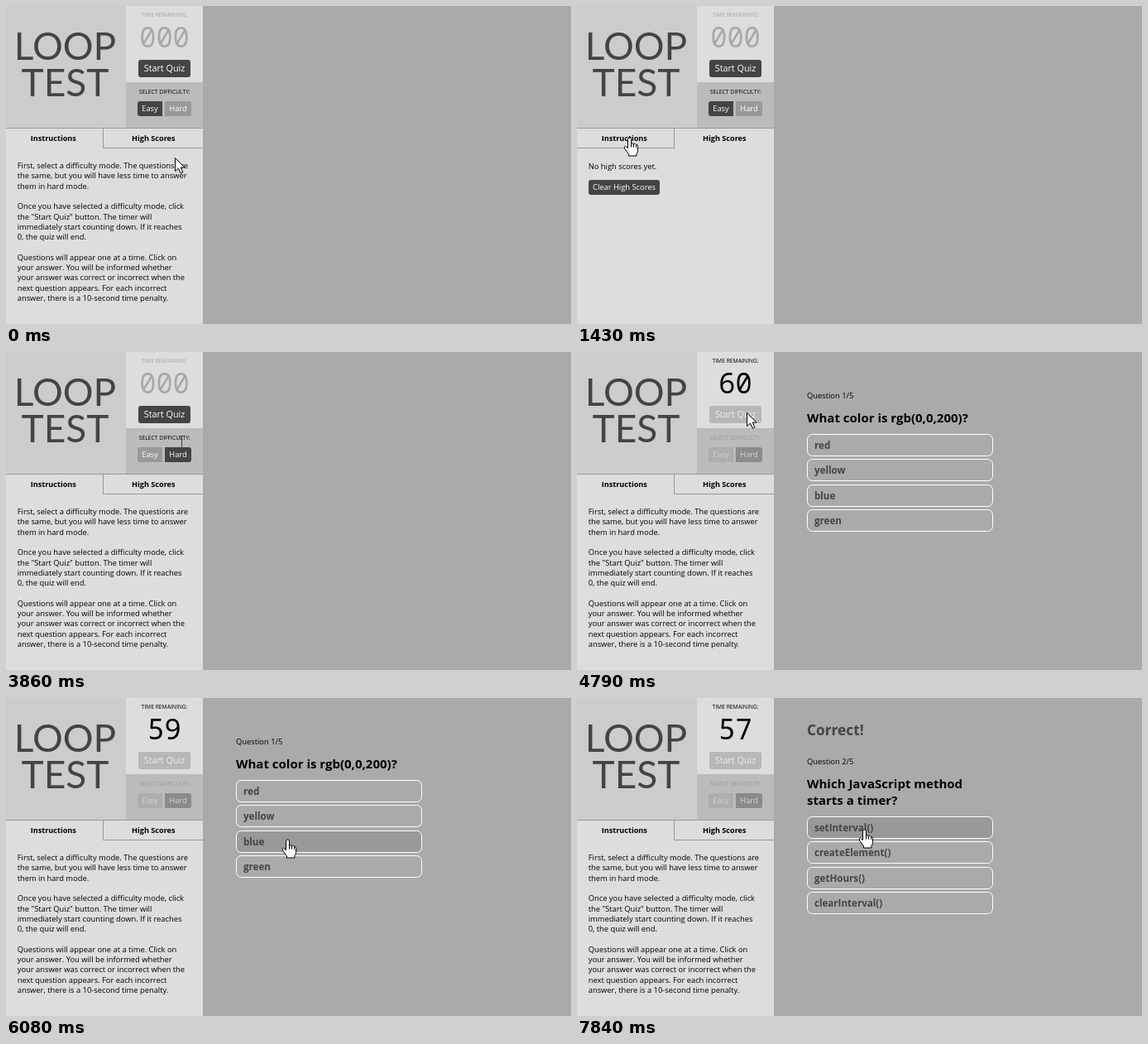
These frames come from a looping animation (683 px wide and 384 px high, 8000 ms). An HTML page with a canvas:

```html
<!DOCTYPE html>
<html lang="en">
<head>
<meta charset="utf-8">
<title>Loop Test</title>
<style>
html, body { margin: 0; width: 100%; height: 100%; overflow: hidden; background: #aaa; }
canvas { display: block; width: 683px; height: 384px; }
</style>
</head>
<body>
<canvas id="stage" width="683" height="384"></canvas>
<script>
const ctx = document.getElementById('stage').getContext('2d');
const LOOP = 8000;
const SANS = '"Open Sans", "Noto Sans", sans-serif';
const BODY = `9.35px ${SANS}`;
const SMALL = `6.75px ${SANS}`;
const DARK = '#444', LINE = '#999';

const INSTRUCTIONS = [
  'First, select a difficulty mode. The questions are',
  'the same, but you will have less time to answer',
  'them in hard mode.',
  '',
  'Once you have selected a difficulty mode, click',
  'the "Start Quiz" button. The timer will',
  'immediately start counting down. If it reaches',
  '0, the quiz will end.',
  '',
  'Questions will appear one at a time. Click on',
  'your answer. You will be informed whether',
  'your answer was correct or incorrect when the',
  'next question appears. For each incorrect',
  'answer, there is a 10-second time penalty.'
];

const QUESTIONS = [
  { top: 99, label: 56, head: ['What color is rgb(0,0,200)?'],
    answers: ['red', 'yellow', 'blue', 'green'] },
  { top: 143, label: 80, head: ['Which JavaScript method', 'starts a timer?'],
    answers: ['setInterval()', 'createElement()', 'getHours()', 'clearInterval()'] }
];

// Event times in ms
const SCORES = 630, BACK = 1900, HARD = 3360, START = 4630, NEXT = 6390;
const TICKS = [5590, 6700, 7840];

// Sampled pointer positions: time, x, y, shape
const POINTER = [
  [0, 204, 183, 'arrow'], [150, 178, 160, 'hand'],
  [950, 150, 162, 'hand'], [1110, 105, 161, 'hand'], [1270, 72, 159, 'hand'], [1430, 64, 158, 'hand'],
  [2400, 150, 150, 'hand'], [2560, 224, 137, 'arrow'], [2720, 218, 130, 'hand'],
  [2890, 218, 128, 'hand'], [3040, 218, 127, 'hand'],
  [3860, 212, 108, 'beam'], [4010, 209, 84, 'hand'], [4170, 206, 77, 'hand'],
  [4330, 205, 73, 'hand'], [START, 205, 73, 'arrow'],
  [5590, 230, 92, 'arrow'], [5750, 288, 138, 'hand'], [5910, 332, 166, 'hand'],
  [6080, 341, 170, 'hand'], [NEXT, 341, 172, 'arrow'],
  [7040, 343, 166, 'hand'], [7200, 346, 161, 'hand'], [7360, 348, 158, 'hand']
];

const SHAPES = {
  arrow: new Path2D('M0 0V16L4 12.6L6.8 18.6L9.4 17.4L6.8 11.5H11.4Z'),
  hand: new Path2D('M-3 1.6Q-1-.8 1 1.6V8Q2.6 6.4 4 8Q5.8 7 7 9Q9 8.6 9 11V16Q9 18.6 7.4 20V22.5H-2V20.5L-7 13.6Q-8 11-6 10.8L-3 13Z'),
  beam: new Path2D('M-3-7H3M0-7V7M-3 7H3')
};
const KNUCKLES = new Path2D('M1 8V12M4 8.4V12M7 9.4V12.4');

function rect(x, y, w, h, color) {
  ctx.fillStyle = color;
  ctx.fillRect(x, y, w, h);
}

function text(str, x, y, font, color = '#000', align = 'left') {
  ctx.font = font;
  ctx.fillStyle = color;
  ctx.textAlign = align;
  ctx.fillText(str, x, y);
}

function button(label, x, y, w, h, fill, size, ink = '#fff', radii = 3) {
  ctx.beginPath();
  ctx.roundRect(x, y, w, h, radii);
  ctx.fillStyle = fill;
  ctx.fill();
  const base = Math.round(y + h / 2 + size * 0.36);
  text(label, x + w / 2, base, `${size}px ${SANS}`, ink, 'center');
}

function header(t) {
  const running = t >= START, hard = t >= HARD;
  rect(0, 0, 145, 147, '#ccc');
  rect(145, 0, 93, 92, '#ddd');
  rect(145, 92, 93, 55, '#bbb');
  text('LOOP', 71.5, 65, '46px Lato, sans-serif', DARK, 'center');
  text('TEST', 71.5, 108.5, '46px Lato, sans-serif', DARK, 'center');

  const left = 60 - TICKS.filter(k => t >= k).length;
  const ink = running ? '#000' : '#a8a8a8';
  text('TIME REMAINING:', 191.5, 13, SMALL, ink, 'center');
  text(running ? String(left) : '000', 191.5, 50, '33.7px "Noto Sans Mono", monospace', ink, 'center');

  const [on, off, label] = running ? ['#8b8b8b', '#adadad', '#d6d6d6'] : [DARK, '#999', '#fff'];
  button('Start Quiz', 160, 65, 63, 21, running ? '#b7b7b7' : DARK, 10.8, running ? '#eee' : '#fff');
  text('SELECT DIFFICULTY:', 191.8, 106, SMALL, running ? '#999' : '#000', 'center');
  button('Easy', 159, 115, 30, 18, hard ? off : on, 9.35, label, [3, 0, 0, 3]);
  button('Hard', 192, 115, 32, 18, hard ? on : off, 9.35, label, [0, 3, 3, 0]);
}

function panel(t) {
  const scores = t >= SCORES && t < BACK;
  rect(0, 147, 238, 237, '#ddd');
  rect(0, 147, 238, 1, LINE);
  rect(117, 148, 1, 24, LINE);
  rect(scores ? 0 : 117, 171, scores ? 118 : 121, 1, LINE);
  text('Instructions', 57.3, 163, `bold 9.1px ${SANS}`, '#000', 'center');
  text('High Scores', 178.3, 163, `bold 9.1px ${SANS}`, '#000', 'center');
  if (scores) {
    text('No high scores yet.', 13.7, 197, BODY);
    button('Clear High Scores', 14, 210, 86, 18, DARK, 9.35);
  } else {
    INSTRUCTIONS.forEach((line, i) => text(line, 13.7, Math.round(196 + i * 12.3), BODY));
  }
}

function quiz(t, [, px, py]) {
  if (t < START) return;
  const n = t >= NEXT ? 1 : 0;
  const q = QUESTIONS[n];
  if (n) text('Correct!', 278, 45, `bold 17.3px ${SANS}`, DARK);
  text(`Question ${n + 1}/5`, 278, q.label, BODY);
  q.head.forEach((line, i) => text(line, 278, q.label + 29 + i * 20.4, `bold 15px ${SANS}`));
  q.answers.forEach((answer, i) => {
    const y = Math.round(q.top + i * 30.4);
    const hover = px >= 278 && px < 503 && py >= y && py < y + 27;
    ctx.beginPath();
    ctx.roundRect(278.5, y + 0.5, 224, 26, 6);
    ctx.fillStyle = hover ? '#999' : '#aaa';
    ctx.fill();
    ctx.strokeStyle = '#fff';
    ctx.lineWidth = 1;
    ctx.stroke();
    text(answer, 287, y + 18, `bold 11.6px ${SANS}`, DARK);
  });
}

function pointer([, x, y, kind]) {
  ctx.save();
  ctx.translate(x + 0.5, y + 0.5);
  ctx.lineWidth = 1;
  ctx.lineJoin = 'round';
  ctx.strokeStyle = kind === 'beam' ? DARK : '#000';
  if (kind !== 'beam') {
    ctx.fillStyle = '#fff';
    ctx.fill(SHAPES[kind]);
  }
  ctx.stroke(SHAPES[kind]);
  if (kind === 'hand') ctx.stroke(KNUCKLES);
  ctx.restore();
}

const begin = performance.now();

function frame() {
  const t = (performance.now() - begin) % LOOP;
  const at = POINTER.filter(p => t >= p[0]).pop();
  rect(0, 0, 683, 384, '#aaa');
  header(t);
  panel(t);
  quiz(t, at);
  pointer(at);
  requestAnimationFrame(frame);
}
frame();
</script>
</body>
</html>
```
